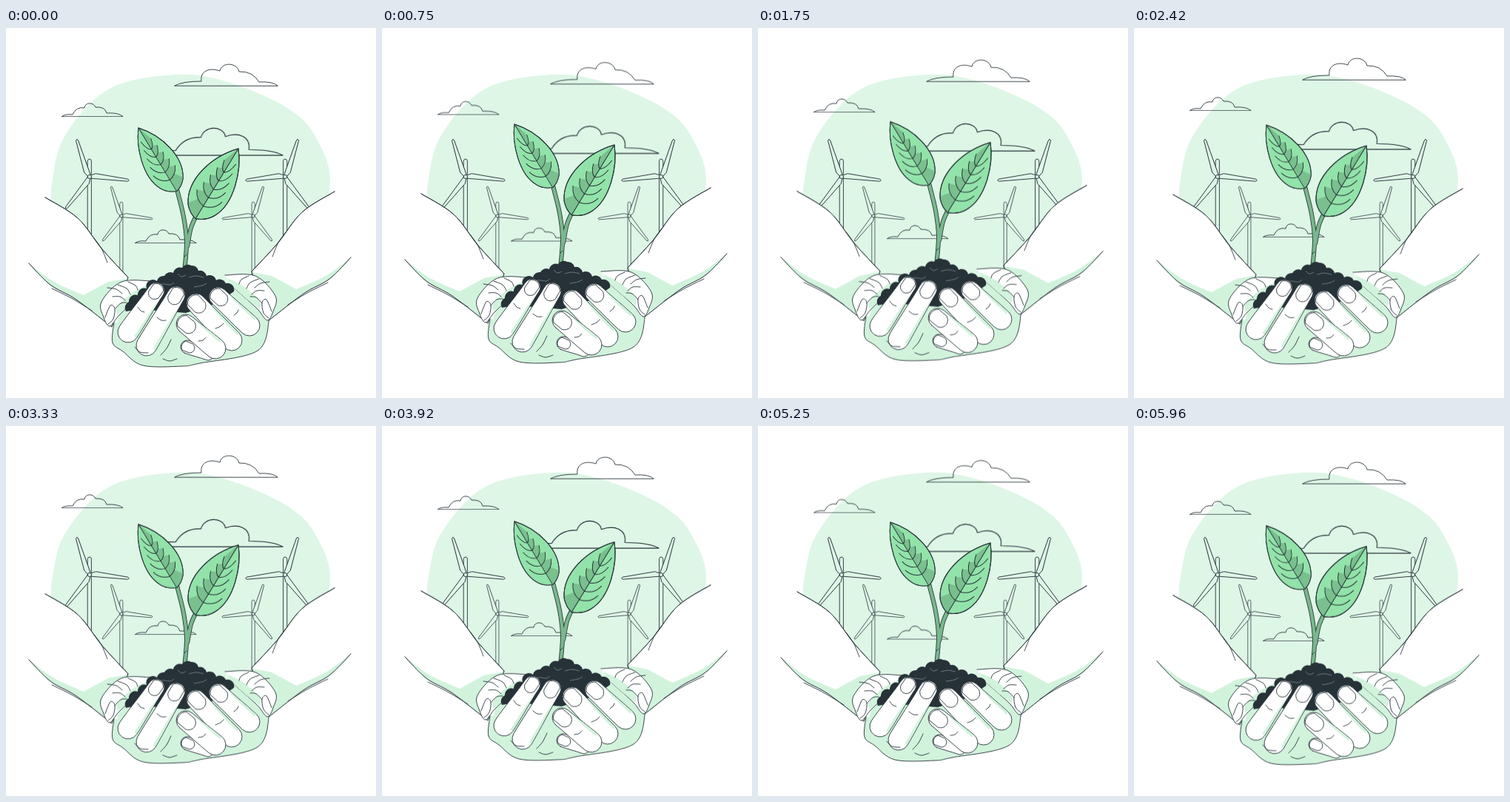
An HTML page for the animation above (6000 ms loop, 500 by 500 pixels).

```html
<!DOCTYPE html>
<html lang="en">
<head>
<meta charset="utf-8">
<title>Seedling in hands</title>
<style>
  html, body { margin: 0; width: 100%; height: 100%; overflow: hidden; background: #fff; }
  svg { display: block; width: 100%; height: 100%; }
  .ink { stroke: #263238; stroke-width: .9; stroke-linecap: round; stroke-linejoin: round; }
  .ink path { vector-effect: non-scaling-stroke; }
  .line { fill: none; }
  .white { fill: #fff; }
  .sky { fill: #def6e6; }
  .mint { fill: #d1f3dc; stroke: none; }
  .leaf { fill: #92e3a9; }
  .shade { fill: #79c08e; }
  .soil { fill: #263238; }
  .crumb { fill: none; stroke: #8d9a99; stroke-width: .7; }
  .rim, .stem { fill: none; stroke: #263238; stroke-width: 6; }
  .stem { stroke: #79b88c; stroke-width: 4.3; }
  .float { animation: float 3s linear infinite; }
  .slow { animation-duration: 6s; }
  @keyframes float { 50% { transform: translateY(-10px); } }
</style>
</head>
<body>
<svg viewBox="0 0 500 500">
  <defs>
    <path id="blade" d="M1 -2 L8 -5 L52 -1.6 Q55 0 52 1.4 L3 2 Z"/>
    <g id="turbine">
      <path d="M-2.8 150 V-21 Q-2.6 -24 0 -24 Q2.4 -24 2.4 -21 V150"/>
      <use href="#blade" transform="rotate(-109)"/>
      <use href="#blade" transform="rotate(5.3)"/>
      <use href="#blade" transform="rotate(127)"/>
      <circle r="2.6"/>
    </g>
    <g id="turbines">
      <use href="#turbine" transform="translate(113 201)"/>
      <use href="#turbine" transform="translate(156 254) scale(.79)"/>
    </g>
    <path id="puff" d="M75.5 119.5 Q80 116 90 117 Q95 106 106 108 C107 100 118 100 121 107 Q134 106 136 115 Q152 114 158 119.5 Z"/>
    <path id="cloud" d="M228 78 Q238 72 264 72 C262 58 275 53 289 58 C291 46 312 46 315 59 Q333 58 342 73 Q361 72 367 78 Z"/>
    <path id="arm" data-s="53 229 97 257 130 299 165 337, 143 404 95 367 60 347 31 318"/>
    <path id="stalk" data-s="259 250 250 270 245 296 | 231 218 240 255 244 290 241 330"/>
    <g id="sleeve">
      <use href="#arm" class="ink white"/>
      <path class="mint" data-s="31 318 65 343 105 361, 138 343 165 338, 143 404 95 367 60 347 31 318"/>
      <use href="#arm" class="ink line"/>
      <path class="ink line" data-s="62 352 90 366 116 382 | 119 284 129 298 137 317"/>
    </g>
    <g id="thumb">
      <path class="ink white" data-s="197 342 156 343 129 370 132 391 140 403 152 389 166 376 190 355"/>
      <path class="mint" data-s="194 346 172 357 151 376 150 388, 166 376, 190 355"/>
      <path class="ink line" data-s="134 391 141 375 147 379 145 393 138 400 | 147 380 155 372 163 371 | 137 351 149 353 157 359 | 151 347 163 352 168 360 | 144 363 154 363 161 368 | 165 343 175 348 178 354"/>
    </g>
    <g id="frond">
      <path id="rim" class="leaf" d="M0 0 C25 -22 65 -33 90 -16 Q98 -9 100 0 Q95 12 85 17 C60 30 20 16 0 0 Z"/>
      <path id="dusk" class="shade" stroke="none"/>
      <use href="#rim" fill-opacity="0"/>
      <path id="veins" class="line"/>
    </g>
  </defs>

  <path class="sky" data-s="62 250 62 210 80 145 140 82 230 63 300 73 380 108 420 150 437 218 390 320 250 350 110 320 62 250"/>

  <g class="ink line float slow">
    <use href="#puff"/>
    <use href="#puff" x="99" y="171"/>
    <use href="#cloud"/>
    <use href="#cloud" transform="translate(374 172) scale(-1.27 1.27) translate(-228 -78)"/>
  </g>

  <g class="ink sky">
    <use href="#turbines"/>
    <use href="#turbines" transform="matrix(-1 0 0 1 490 0)"/>
  </g>

  <g class="float">
    <use href="#sleeve"/>
    <use href="#sleeve" transform="matrix(-1 0 0 1 497 -8)"/>
    <path class="mint" d="M150 400 L160 360 L200 345 H300 L335 350 L352 395 Z"/>
    <path class="mint" data-s="146 398 144 425 158 437 185 456 238 457 262 453 340 436 356 391"/>
    <path class="ink line" data-s="146 398 144 425 158 437 185 456 238 457 262 453 340 436 356 391"/>
    <use href="#thumb"/>
    <use href="#thumb" transform="matrix(-1 0 0 1 493 -8)"/>

    <use href="#stalk" class="rim"/>
    <use href="#stalk" class="stem"/>
    <path class="ink line" d="M241 309 L244 306"/>
    <path id="soil" class="soil"/>
    <path class="crumb" data-s="206 346 214 346 222 347 227 344 | 232 332 237 336 243 334 | 247 337 257 335 267 337 | 254 350 265 348 271 345"/>
    <g class="ink">
      <use href="#frond" transform="translate(179 135) rotate(58.9)"/>
      <use href="#frond" transform="translate(314 163) rotate(121.4) scale(1.11 -1.16)"/>
    </g>

    <g id="fingers" class="ink"></g>
    <path class="ink line" data-s="178 377 182 382 187 384 | 204 391 210 395 216 395 | 283 406 290 403 294 399 | 308 388 312 385 314 381 | 260 423 266 422 270 418 | 174 431 181 438 192 439 | 209 442 217 433 223 421 | 212 447 221 450 231 447"/>
  </g>
</svg>
<script>
  const get = id => document.getElementById(id);

  // Rounded curve through points: "|" lifts the pen, "," makes a corner.
  function curve(text) {
    const n = text.trim().split(/\s+/).map(Number);
    const p = n.filter((_, i) => i % 2 === 0).map((x, i) => [x, n[2 * i + 1]]);
    let d = p[0].join(' ');
    for (let i = 0; i < p.length - 1; i++) {
      const a = p[i], b = p[i + 1], before = p[i - 1] || a, after = p[i + 2] || b;
      const c1 = a.map((v, k) => v + (b[k] - before[k]) / 6);
      const c2 = b.map((v, k) => v - (after[k] - a[k]) / 6);
      d += `C${[...c1, ...c2, ...b].join(' ')}`;
    }
    return d;
  }
  for (const path of document.querySelectorAll('[data-s]')) {
    path.setAttribute('d', path.dataset.s.split('|')
      .map(part => 'M' + part.split(',').map(curve).join('L')).join(''));
  }

  // Veins sweep back to the leaf tip; the dark half is toothed between them.
  let veins = 'M0 0H100', dusk = 'M0 0';
  for (let i = 0; i < 5; i++) {
    const x = 34 + 12 * i, h = 7 + 2.3 * i;
    veins += `M${x} 0Q${x - 3} ${h * .8} ${x - 16} ${h}M${x} 0Q${x - 2} ${-h * .7} ${x - 13} ${-h}`;
    dusk += `L${x - 13} ${-h}L${x - 4} ${-h * .6}`;
  }
  get('veins').setAttribute('d', veins);
  get('dusk').setAttribute('d', dusk + 'L88 -17Q98 -9 100 0Z');

  const clods = ['166 370', '178 361', '190 352', '204 342', '214 335', '226 331', '238 324',
    '250 321', '260 328', '271 335', '284 341', '297 345', '308 356'];
  get('soil').setAttribute('d', 'M162 383' + clods.map(c => `A9 9 0 0 1 ${c}`).join('') + 'L285 372L243 385L180 380Z');

  // Tapered finger from the tip (x, y) to the knuckle (u, v), with radii r and s.
  function finger(x, y, u, v, r, s) {
    const len = Math.hypot(u - x, v - y), turn = Math.atan2(v - y, u - x) * 180 / Math.PI;
    const a = len * .3, b = len * .7, w = r * .72;
    return `<g transform="translate(${x} ${y}) rotate(${turn})">
      <path class="white" d="M0 ${r}A${r} ${r} 0 0 1 0 ${-r}C${a} ${-r} ${b} ${-s} ${len} ${-s}A${s} ${s} 0 0 1 ${len} ${s}C${b} ${s} ${a} ${r} 0 ${r}Z"/>
      <path class="mint" d="M${a / 2} ${.5 - r}C${a} ${.5 - r} ${b} ${.5 - s} ${len} ${.5 - s}V${4 - s}C${b} ${4 - s} ${a} ${3 - r} ${a / 2} ${.5 - r}Z"/>
      <path class="white" d="M${-r * .5} ${-w}C${-r} ${-w * .6} ${-r} ${w * .6} ${-r * .5} ${w}L${r * .6} ${w}C${r * 1.3} ${w * .6} ${r * 1.3} ${-w * .6} ${r * .6} ${-w}Z"/>
    </g>`;
  }
  get('fingers').innerHTML = [
    [203, 355, 165, 411, 11, 14],
    [230, 361, 190, 429, 12, 14],
    [287, 363, 329, 402, 12.5, 14],
    [257, 372, 305, 422, 13, 14],
    [245, 431, 273, 442, 9, 7],
    [243, 400, 283, 433, 13, 14]
  ].map(f => finger(...f)).join('');
</script>
</body>
</html>
```
